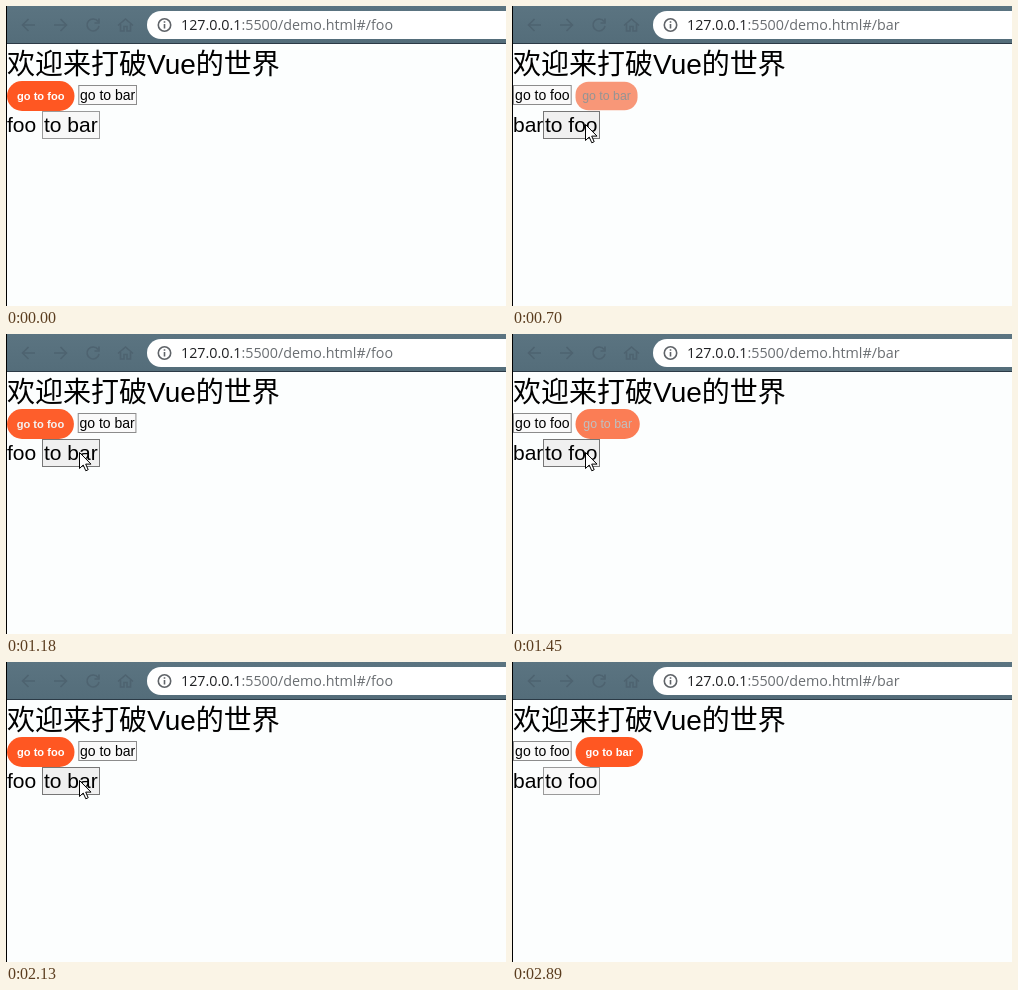
These frames come from a looping animation (500x300 px, 2.96 s). An HTML page:

```html
<!DOCTYPE html>
<html lang="zh-CN">
<head>
<meta charset="utf-8">
<title>Router demo</title>
<style>
html, body { margin: 0; width: 100%; height: 100%; overflow: hidden; background: #fcfefe; }
svg { display: block; width: 500px; height: 300px; }
text { font-family: "Liberation Sans", Arial, "Noto Sans CJK SC", "Noto Sans CJK", sans-serif; white-space: pre; }
.title { font-size: 28px; }
.body { font-size: 21px; }
.url { font: 14.3px "Open Sans", "Noto Sans", sans-serif; fill: #6a6e72; }
.host { fill: #202124; }
.icons { fill: none; stroke: #4e6370; stroke-width: 1.6; }
.info { fill: none; stroke: #5f6368; stroke-width: 1.6; }
.link { text-anchor: middle; }
</style>
</head>
<body>
<svg viewBox="0 0 500 300">
  <defs>
    <linearGradient id="bar" x2="0" y2="1">
      <stop offset="0" stop-color="#5b7481"/>
      <stop offset="1" stop-color="#546d7a"/>
    </linearGradient>
  </defs>
  <rect width="500" height="300" fill="#fcfefe"/>
  <rect width="500" height="37" fill="url(#bar)"/>
  <rect y="37" width="500" height="1" fill="#2b3a46"/>
  <rect width="1" height="300" fill="#000"/>
  <g class="icons">
    <path d="M29 19H17M22.5 13L16.5 19L22.5 25"/>
    <path d="M48 19H60M54.500 13L60.500 19L54.500 25"/>
    <path d="M92 15.500A6 6 0 1 0 93 20M93 12.500V17H88.500"/>
    <path d="M112 19.500L119.500 13L127 19.500M114.500 18V25H118V20.500H121V25H124.500V18"/>
  </g>
  <rect x="141" y="5" width="380" height="28" rx="14" fill="#fff"/>
  <circle class="info" cx="158.500" cy="19" r="6.200"/>
  <path class="info" d="M158.500 18V22.500M158.500 15.200V16.800"/>
  <text class="url" x="175" y="24"><tspan class="host">127.0.0.1</tspan>:5500/demo.html#/<tspan id="route">foo</tspan></text>

  <text class="title" x="1" y="68">欢迎来打破Vue的世界</text>
  <g id="nav">
    <g><rect/><text class="link">go to foo</text></g>
    <g><rect/><text class="link">go to bar</text></g>
  </g>
  <text id="page" class="body" x="1" y="126">foo</text>
  <rect id="box" y="105.500" height="27"/>
  <text id="action" class="body" y="126">to bar</text>
  <path id="cursor" d="M.5 .5V16.500L4.200 13L6.800 18.800L9.200 17.700L6.700 12.100H12Z" fill="#fff" stroke="#000"/>
</svg>
<script>
const LOOP = 2960, FADE = 300, GAP = 3.8;
// Moments at which the page switches; odd counts show "bar".
const switches = [600, 960, 1315, 1725, 2195];
const URL_LEAD = 15, PRESS = 60;
const HOVER_START = 385, HOVER_END = 2300;
const $ = id => document.getElementById(id);
const links = [...$("nav").children];
const clamp = v => Math.max(0, Math.min(1, v));
const mix = (a, b, p) => a + (b - a) * p;
const mixColor = (a, b, p) => `rgb(${a.map((v, i) => Math.round(mix(v, b[i], p)))})`;

function set(el, attrs) {
  for (const name in attrs) el.setAttribute(name, attrs[name]);
}

// cubic-bezier(.25, .1, .25, 1), solved for x by bisection
function ease(x) {
  const curve = (a, b, u) => 3 * a * u * (1 - u) ** 2 + 3 * b * u * u * (1 - u) + u ** 3;
  let low = 0, high = 1;
  for (let i = 0; i < 18; i++) {
    const mid = (low + high) / 2;
    if (curve(.25, .25, mid) < x) low = mid; else high = mid;
  }
  return curve(.1, 1, low);
}

function drawLink(group, x, active, p) {
  const [rect, label] = group.children;
  const width = active ? mix(54.5, 67.5, p) : 58.7;
  const height = active ? mix(20, 30, clamp(p * 1.5)) : 20;
  const inset = active ? 0 : .5;
  set(rect, {
    x: x + inset, y: 90 - height / 2 + inset - (active ? 0 : 1),
    width: width - 2 * inset, height: height - 2 * inset,
    rx: active ? 15 * clamp(p * 1.5) : 0,
    fill: active ? mixColor([239, 239, 239], [255, 87, 34], p) : "#fafafa",
    stroke: active ? "none" : "#8c8c8c"
  });
  const bold = active && p > .85;
  set(label, {
    x: x + width / 2, y: active ? 93.7 : 94,
    "font-size": bold ? 11.1 : active ? 12.35 : 14,
    "font-weight": bold ? 700 : 400,
    fill: active ? mixColor([0, 0, 0], [255, 255, 255], p) : "#000"
  });
  return x + width + GAP;
}

const path = [
  [60, 354, 274], [160, 229, 206], [260, 133, 155], [400, 73, 118],
  [2260, 73, 118], [2330, 153, 137.5], [2430, 318, 196], [2550, 500, 258]
];

function drawCursor(t) {
  const next = path.findIndex(k => k[0] > t);
  $("cursor").style.display = next > 0 ? "" : "none";
  if (next < 1) return;
  const [t0, x0, y0] = path[next - 1], [t1, x1, y1] = path[next];
  const p = (t - t0) / (t1 - t0);
  set($("cursor"), { transform: `translate(${mix(x0, x1, p)} ${mix(y0, y1, p)})` });
}

function draw(t) {
  const count = switches.filter(s => s <= t).length;
  const bar = count % 2;
  const p = count ? ease(clamp((t - switches[count - 1]) / FADE)) : 1;
  const ahead = switches.filter(s => s - URL_LEAD <= t).length % 2;
  $("route").textContent = ahead ? "bar" : "foo";

  const second = drawLink(links[0], 1, !bar, p);
  drawLink(links[1], second, !!bar, p);

  const left = bar ? 31 : 36;
  const pressed = switches.some(s => t >= s - PRESS && t < s);
  const hover = t >= HOVER_START && t < HOVER_END && !pressed;
  $("page").textContent = bar ? "bar" : "foo";
  $("action").textContent = bar ? "to foo" : "to bar";
  set($("action"), { x: left + 2 });
  set($("box"), {
    x: left + .5, width: bar ? 56 : 57,
    fill: hover ? "#f0f0f0" : "#f8f8f8",
    stroke: hover ? "#767676" : "#9a9a9a"
  });
  drawCursor(t);
}

const start = performance.now();
function tick() {
  draw((performance.now() - start) % LOOP);
  requestAnimationFrame(tick);
}
tick();
</script>
</body>
</html>
```
